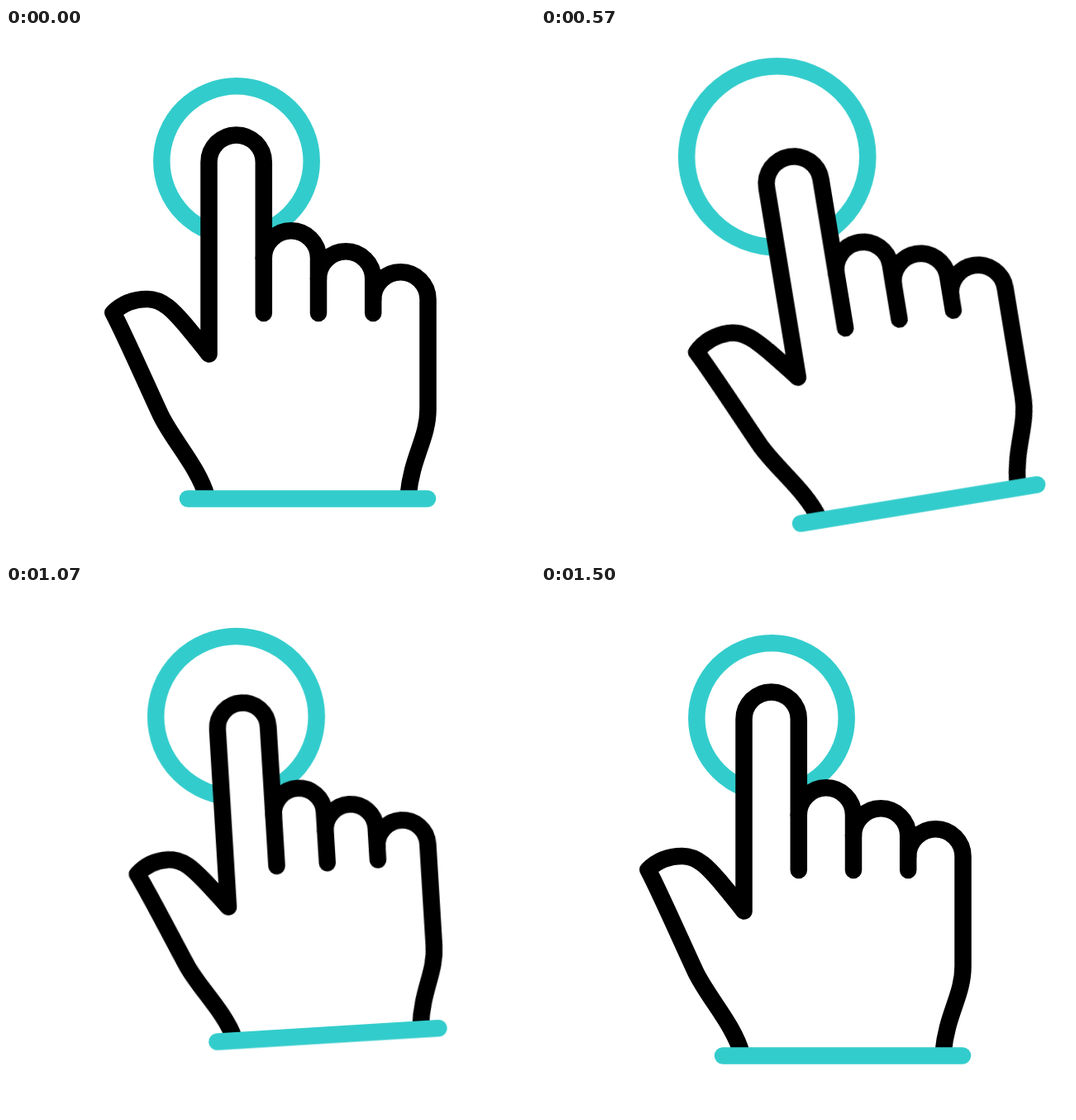
Animation, 640 px wide and 640 px high, one loop 1670 ms. Source, as an HTML page:

```html
<!DOCTYPE html>
<html lang="en">
<head>
<meta charset="utf-8">
<title>Double tap</title>
<style>
  html, body { margin: 0; width: 100%; height: 100%; overflow: hidden; background: #fff; }
  svg { display: block; width: 640px; height: 640px; }

  path, circle {
    fill: none;
    stroke: #000;
    stroke-width: 20.5px;
    stroke-linecap: round;
    stroke-linejoin: round;
    vector-effect: non-scaling-stroke;
  }
  .palm { fill: #fff; }
  .ring, .cuff { stroke: #3cc; }

  .ring, .swing, .press {
    animation: 1670ms cubic-bezier(.333, 0, .667, 1) infinite;
  }
  .ring { transform-origin: 279px 161px; animation-name: ring; }
  .swing, .press { transform-origin: 245px 174px; }
  .swing { animation-name: swing; }
  .press { animation-name: press; }

  /* One ripple per tap, each drifting its own way */
  @keyframes ring {
    0%, 14%, 42%, 60.2%, 89.2%, 100% { transform: translate(0, 0) scale(1); }
    28% { transform: translate(11.3px, -9px) scale(1.355); }
    73.8% { transform: translate(-2.5px, -8.5px) scale(1.358); }
  }
  @keyframes swing {
    0%, 4%, 80%, 100% {
      transform: translate(0, 0) rotate(0deg);
      animation-timing-function: cubic-bezier(.5, 0, .49, 1);
    }
    42% {
      transform: translate(31.6px, 33.4px) rotate(-10deg);
      animation-timing-function: cubic-bezier(.535, 0, .49, 1);
    }
  }
  @keyframes press {
    0%, 4%, 28%, 58.6%, 80%, 100% { transform: scale(1); }
    16%, 69.8% { transform: scale(.85); }
  }
</style>
</head>
<body>
<svg viewBox="0 0 640 640">
  <circle class="ring" cx="279" cy="161" r="90.7"/>
  <g class="swing">
    <g class="press">
      <path class="palm" d="M242.5 566 C233 532 202 499 187 468 C176 445 145 374 129.5 344.5
        C139 335 153 328 171 328 C190 328 203 343 216 358 C226 370 236 382 245.5 394.5
        V162.5 a33.15 33.15 0 0 1 66.3 0 V278.4
        a33.1 33.1 0 0 1 66.2 0 V303.3
        a33.1 33.1 0 0 1 66.2 0 V328.3
        a33.15 33.15 0 0 1 66.3 0 V461 C510.5 497 491 518 486.5 566"/>
      <path d="M311.8 278 V345 M378 303 V345 M444.2 328 V345"/>
      <path class="cuff" d="M220 569.4 H510"/>
    </g>
  </g>
</svg>
</body>
</html>
```
